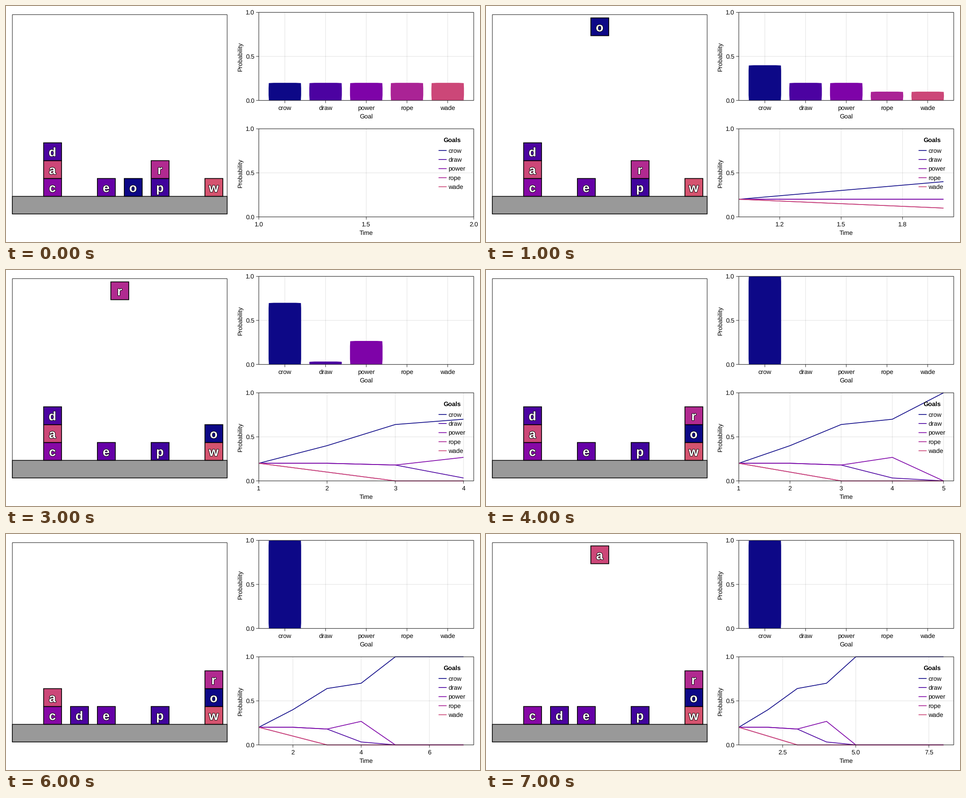
These frames come from a looping animation (1058 by 529 pixels, 8000 ms). A matplotlib script:

```python
import matplotlib.pyplot as plt
from matplotlib.animation import FuncAnimation
from matplotlib.patches import Polygon, Rectangle
from matplotlib.patheffects import withStroke

W, H, DPI = 1058, 529, 64
PT = 72 / DPI  # points per pixel

plt.rcParams.update({
    "font.family": "Liberation Sans",
    "text.hinting": "none",
    "path.snap": False,
})
fig = plt.figure(figsize=(W / DPI, H / DPI), dpi=DPI, facecolor="white")
ax = fig.add_axes([0, 0, 1, 1])

plasma = plt.get_cmap("plasma")
GOALS = ["crow", "draw", "power", "rope", "wade"]
GOAL_COLORS = [plasma(i / 8) for i in range(5)]
SHADES = dict(o=0, p=0.1, d=0.125, e=0.19, c=0.275, r=0.4, a=0.5, w=0.54)

START = {1: "cad", 2: "", 3: "e", 4: "o", 5: "pr", 7: "w"}
MOVES = [(4, 7), (5, 7), (1, 2), (1, 2)]  # (from column, to column)

# Goal probabilities at each time step; once certain, they stay.
PROBS = [
    (0.2, 0.2, 0.2, 0.2, 0.2),
    (0.4, 0.2, 0.2, 0.1, 0.1),
    (0.64, 0.18, 0.18, 0, 0),
    (0.7, 0.033, 0.267, 0, 0),
] + [(1, 0, 0, 0, 0)] * 4

TICKS = [
    (1.0, 1.5, 2.0), (1.2, 1.5, 1.8), (1.0, 1.5, 2.0, 2.5, 3.0),
    (1, 2, 3, 4), (1, 2, 3, 4, 5), (2, 4, 6), (2, 4, 6), (2.5, 5.0, 7.5),
]

LEFT, WIDTH, HEIGHT = 564.3, 479.7, 197.4
TOP_BAR, TOP_LINE = 14.3, 275.3
BLOCK, FLOOR = 40, 426.6
FRAME, GRID = "#222222", (0, 0, 0, 0.12)


def line(xs, ys, color, width, z):
    ax.plot(xs, ys, color=color, lw=width * PT, zorder=z,
            solid_capstyle="butt", solid_joinstyle="miter")


def text(x, y, s, size=14, ha="center", **kw):
    kw.setdefault("color", "black")
    return ax.text(x, y, s, fontsize=size * PT, ha=ha, va="baseline",
                   zorder=8, **kw)


def box(x, y, w, h, fill, edge, width, z):
    ax.add_patch(Rectangle((x, y), w, h, fc=fill, ec=edge, lw=width * PT,
                           joinstyle="miter", zorder=z))


def draw_block(letter, x, y):
    """Draw a block centred on x with its top edge at y."""
    box(x - BLOCK / 2, y, BLOCK, BLOCK, plasma(SHADES[letter]), "black", 1.7, 4)
    label = text(x - 0.4, y + 30.4, letter, 28, color="white", weight="bold")
    label.set_path_effects([withStroke(linewidth=2 * PT, foreground="black")])


def draw_blocks(step):
    stacks = dict(START)
    done, holding = divmod(step, 2)
    for src, dst in MOVES[:done]:
        stacks[dst] += stacks[src][-1]
        stacks[src] = stacks[src][:-1]
    if holding:
        src = MOVES[done][0]
        draw_block(stacks[src][-1], 254, 26.6)
        stacks[src] = stacks[src][:-1]

    box(14.2, 19.4, 479.4, 446.8, "white", FRAME, 1.1, 1)
    box(14.2, FLOOR, 479.4, 39.6, "#999999", "black", 1.5, 2)
    for col, stack in stacks.items():
        for level, letter in enumerate(stack, 1):
            draw_block(letter, 44 + 60 * col, FLOOR - BLOCK * level)


def draw_axes(top, xticks, xlabel):
    """Draw frame, grid, ticks and labels; xticks holds (x, label) pairs."""
    bottom = top + HEIGHT
    for v in (0, 0.5, 1):
        y = bottom - v * HEIGHT
        line([LEFT, LEFT + WIDTH], [y, y], GRID, 1, 1)
        line([LEFT - 6, LEFT], [y, y], FRAME, 1, 6)
        text(554.8, y + 5, f"{v:.1f}", ha="right")
    for x, label in xticks:
        line([x, x], [top, bottom], GRID, 1, 1)
        line([x, x], [bottom, bottom + 6], FRAME, 1, 6)
        text(x, bottom + 21.6, label)
    box(LEFT, top, WIDTH, HEIGHT, "none", FRAME, 1.1, 6)
    text(LEFT + WIDTH / 2, bottom + 40.5, xlabel)
    text(527.3, top + HEIGHT / 2, "Probability", rotation=90,
         rotation_mode="anchor")


def draw_bars(step):
    unit = WIDTH / 5.28
    centers = [LEFT + unit * (0.64 + i) for i in range(5)]
    draw_axes(TOP_BAR, list(zip(centers, GOALS)), "Goal")
    base, half = TOP_BAR + HEIGHT, 0.4 * unit
    for x, p, color in zip(centers, PROBS[step], GOAL_COLORS):
        if p == 0:
            continue
        y = base - p * HEIGHT
        cut = min(12, p * HEIGHT / 2)
        # slightly bulging edges
        outline = [(half - 0.7, base), (half, base - cut), (half, y + cut),
                   (half - 0.5, y + 0.6), (half - 12, y)]
        points = [(x + dx, py) for dx, py in outline]
        points += [(x - dx, py) for dx, py in reversed(outline)]
        ax.add_patch(Polygon(points, fc=color, ec="none", zorder=3))


def draw_lines(step):
    span = 1.05 * step or 1

    def to_x(t):
        return LEFT + WIDTH * (t - 1) / span

    draw_axes(TOP_LINE, [(to_x(t), str(t)) for t in TICKS[step]], "Time")
    text(995.6, 304.6, "Goals", weight="bold")
    xs = [to_x(t) for t in range(1, step + 2)]
    for i, (goal, color) in enumerate(zip(GOALS, GOAL_COLORS)):
        if step:
            ys = [TOP_LINE + HEIGHT * (1 - p[i]) for p in PROBS[:step + 1]]
            line(xs, ys, color, 1.7, 4)
        y = 323.8 + 20.35 * i
        line([965.5, 983.5], [y, y], color, 1.7, 7)
        text(987.4, y + 5, goal, ha="left")


def draw(step):
    ax.clear()
    ax.set(xlim=(0, W), ylim=(H, 0))
    ax.axis("off")
    draw_blocks(step)
    draw_bars(step)
    draw_lines(step)
    return []


anim = FuncAnimation(fig, draw, frames=8, interval=1000, init_func=lambda: [],
                     repeat=True, blit=False)
plt.show()
```
